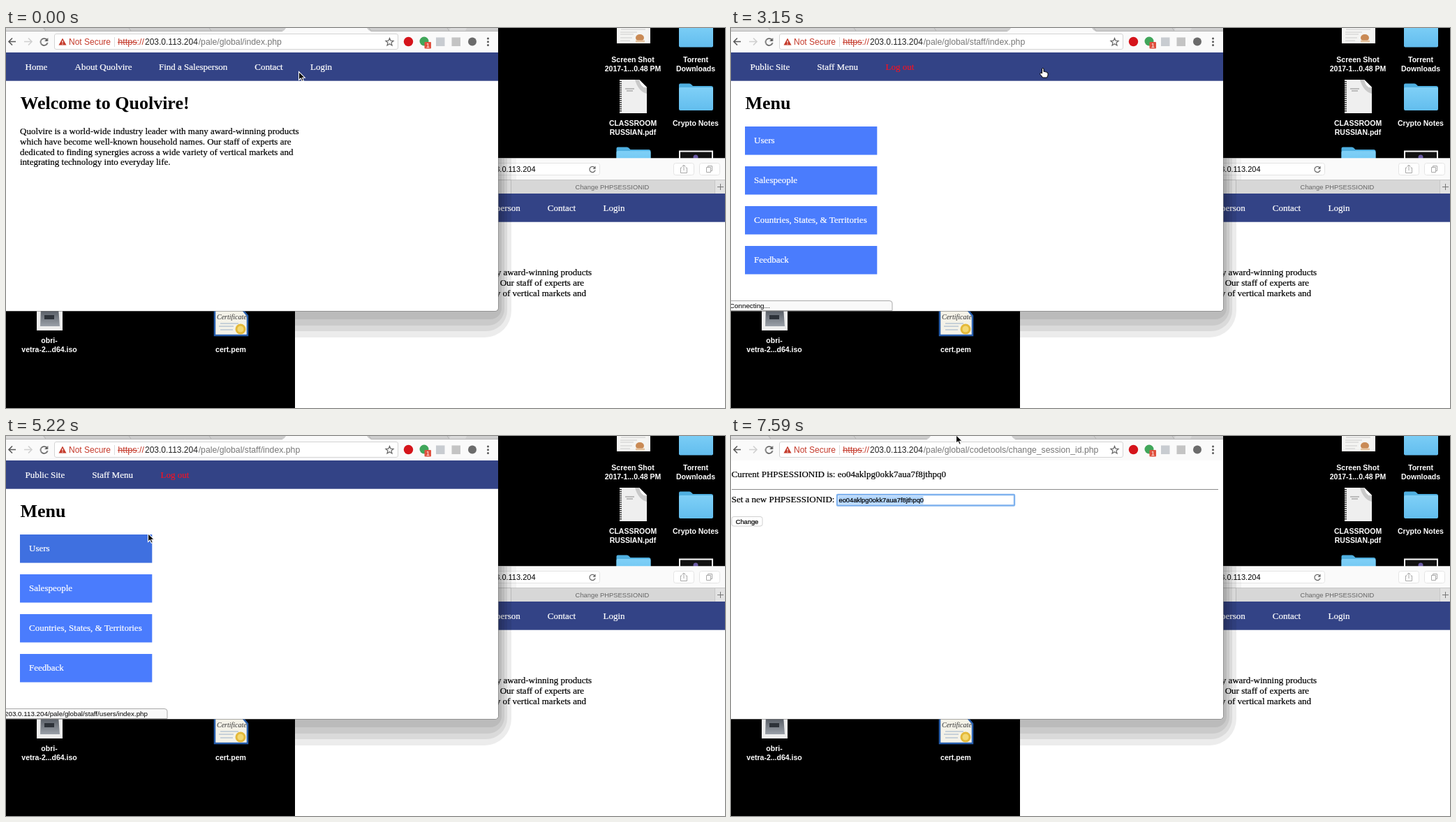
Recreate the animation shown at these times as an HTML page. Size 1030 px wide and 544 px high, loop 8 s.

```html
<!DOCTYPE html>
<html lang="en">
<head>
<meta charset="utf-8">
<title>Staff login</title>
<style>
html, body { margin: 0; width: 100%; height: 100%; overflow: hidden; background: #000; }
svg { display: block; width: 1030px; height: 544px; }
text { white-space: pre; }
.serif { font: 13px "Liberation Serif", serif; }
.serif text { stroke: #000; stroke-width: .22; }
.serif .white text { fill: #fff; stroke: #fff; }
.serif .white .red { fill: #f01426; stroke: #f01426; }
.serif .h1 { font-size: 26px; font-weight: bold; stroke: none; }
.ui { font: 12px "Liberation Sans", sans-serif; }
.path { font-size: 12.25px; fill: #777; }
.tip { font-size: 9.8px; }
.field { font-size: 9.3px; }
.label { font: bold 10.5px "Liberation Sans", sans-serif; fill: #fff; text-anchor: middle; }
.icon { fill: none; stroke: #5a5a5a; stroke-width: 1.6; }
.thin { fill: none; stroke: #a8a8a8; stroke-width: 1; }

.t { animation: 8s step-end infinite; }
.home { animation-name: home; }
.menu { animation-name: menu; }
.form { animation-name: form; }
.url1 { animation-name: url1; }
.url2 { animation-name: url2; }
.idle { animation-name: idle; }
.busy { animation-name: busy; }
.tip1 { animation-name: tip1; }
.tip2 { animation-name: tip2; }
.tip3 { animation-name: tip3; }
.before { animation-name: before; }
.lit { animation-name: lit; }
.users { animation-name: users; }
.arrow { animation-name: arrow; }
.hand { animation-name: hand; }
.mouse { animation-name: mouse; }

@keyframes home { 0% { opacity: 1 } 39.375%, to { opacity: 0 } }
@keyframes menu { 0% { opacity: 0 } 39.375% { opacity: 1 } 94.875%, to { opacity: 0 } }
@keyframes form { 0% { opacity: 0 } 94.875%, to { opacity: 1 } }
@keyframes url1 { 0% { opacity: 1 } 24.5%, to { opacity: 0 } }
@keyframes url2 { 0% { opacity: 0 } 24.5% { opacity: 1 } 94.875%, to { opacity: 0 } }
@keyframes idle { 0% { opacity: 1 } 20.75% { opacity: 0 } 39.375%, to { opacity: 1 } }
@keyframes busy { 0% { opacity: 0 } 20.75% { opacity: 1 } 39.375%, to { opacity: 0 } }
@keyframes tip1 { 0% { opacity: 0 } 5.75% { opacity: 1 } 24.5%, to { opacity: 0 } }
@keyframes tip2 { 0% { opacity: 0 } 24.5% { opacity: 1 } 44.875%, to { opacity: 0 } }
@keyframes tip3 { 0% { opacity: 0 } 61.625% { opacity: 1 } 74.375%, to { opacity: 0 } }
@keyframes before { 0% { opacity: 1 } 94.875%, to { opacity: 0 } }
@keyframes lit { 0% { opacity: 0 } 83.75%, to { opacity: 1 } }
@keyframes users { 0% { fill: #4a7cfd } 61.625% { fill: #3f70e0 } 72.5%, to { fill: #4a7cfd } }
@keyframes arrow { 0% { opacity: 1 } 5.75% { opacity: 0 } 43%, to { opacity: 1 } }
@keyframes hand { 0% { opacity: 0 } 5.75% { opacity: 1 } 43%, to { opacity: 0 } }
@keyframes mouse {
  0% { transform: translate(419px, 62px) }
  1.875% { transform: translate(424px, 62px) }
  3.875% { transform: translate(433px, 61px) }
  5.75% { transform: translate(443px, 59px) }
  7.75% { transform: translate(446px, 58px) }
  13.375% { transform: translate(447px, 57px) }
  43% { transform: translate(435px, 66px) }
  44.875% { transform: translate(395px, 85px) }
  46.75% { transform: translate(340px, 112px) }
  48.625% { transform: translate(289px, 137px) }
  50.5% { transform: translate(257px, 159px) }
  52.25% { transform: translate(238px, 160px) }
  54.125% { transform: translate(228px, 159px) }
  57.875% { transform: translate(222px, 158px) }
  59.75% { transform: translate(213px, 156px) }
  61.625% { transform: translate(206px, 151px) }
  63.375% { transform: translate(204px, 145px) }
  65.25% { transform: translate(203px, 139px) }
  67.125% { transform: translate(202px, 141px) }
  68.875% { transform: translate(201px, 143px) }
  70.625% { transform: translate(203px, 142px) }
  72.5% { transform: translate(250px, 128px) }
  74.375% { transform: translate(334px, 93px) }
  76.25% { transform: translate(320px, 28px) }
  78.125% { transform: translate(322px, 16px) }
  80% { transform: translate(322px, 9px) }
  83.75% { transform: translate(322px, 4px) }
  85.625% { transform: translate(322px, 0) }
  89.25% { transform: translate(321px, -1px) }
  91.125%, to { transform: translate(322px, -2px) }
}
</style>
</head>
<body>
<svg viewBox="0 0 1030 544" xmlns="http://www.w3.org/2000/svg">
<defs>
  <linearGradient id="blue" x2="0" y2="1"><stop stop-color="#7fd0f7"/><stop offset="1" stop-color="#62bdee"/></linearGradient>
  <linearGradient id="disk" x2="0" y2="1"><stop stop-color="#4b5058"/><stop offset="1" stop-color="#9aa0a8"/></linearGradient>
  <clipPath id="win"><path d="M0 0H705V400Q705 405 700 405H0Z"/></clipPath>
  <clipPath id="back"><path d="M414 186.500H1030V544H414Z"/></clipPath>

  <g id="folder">
    <path d="M0 3Q0 1 2 1H15Q17 1 18 2.500L20 4.500H46Q49 4.500 49 7V20H0Z" fill="#4fafe0"/>
    <rect y="6.500" width="49" height="33" rx="2" fill="url(#blue)"/>
  </g>

  <g id="site" class="serif">
    <rect y="35" width="1030" height="40.700" fill="#334386"/>
    <g class="white">
      <text x="27.500" y="60.300">Home</text>
      <text x="98.500" y="60.300">About Quolvire</text>
      <text x="219" y="60.300">Find a Salesperson</text>
      <text x="356.300" y="60.300">Contact</text>
      <text x="436" y="60.300">Login</text>
    </g>
    <text class="h1" x="20.500" y="116.300">Welcome to Quolvire!</text>
    <text x="20" y="152.300">Quolvire is a world-wide industry leader with many award-winning products</text>
    <text x="20" y="166.900">which have become well-known household names. Our staff of experts are</text>
    <text x="20" y="181.600">dedicated to finding synergies across a wide variety of vertical markets and</text>
    <text x="20" y="196.200">integrating technology into everyday life.</text>
  </g>

  <g id="reload">
    <path d="M4 -3.200A5 5 0 1 0 5 1" fill="none" stroke-width="1.500"/>
    <path d="M5.600 -6V-1H.600Z" stroke="none"/>
  </g>
  <path id="bubble" d="M-2 390.500H227Q231 390.500 231 394V404.500H-2Z" fill="#f9f9f9" stroke="#a9a9a9"/>
</defs>

<rect width="1030" height="544"/>

<!-- desktop -->
<path d="M875 0H923V22H875Z" fill="#f4f4f2"/>
<path d="M881 2H916M880 6H904M880 9H899M880 14H897M880 18H894" stroke="#ccc"/>
<ellipse cx="908" cy="14" rx="6" ry="5" fill="#c98a55"/>
<path d="M902 19H915" stroke="#e6c5a2" stroke-width="3"/>
<use href="#folder" x="964" y="-12"/>
<use href="#folder" x="964" y="78.500"/>
<use href="#folder" x="874.500" y="169.500"/>
<path d="M879 74H907L918 85V122H879Z" fill="#efefef"/>
<path d="M901 74H907L918 85V94Q906 91 901 74Z" fill="#c9c9c9"/>
<path d="M907 74L918 85Q910 87 907 74Z" fill="#fff"/>
<path d="M887 87H900M889 90H898" stroke="#888"/>
<path d="M880.500 76V121" stroke="#333" stroke-width="3" stroke-dasharray="1.500 1.500"/>
<path d="M965 187V176.500H1012V187" fill="#111" stroke="#fff" stroke-width="2"/>
<circle cx="988" cy="185" r="3.500" fill="#6a5ba5"/>
<path d="M44 400H81V433H44Z" fill="#eee"/>
<path d="M50 400H75L77 427H49Z" fill="url(#disk)"/>
<rect x="55" y="411" width="14" height="6" fill="#2d3239"/>
<path d="M299 400H336L346 412V440H299Z" fill="#f4f2e8" stroke="#285fae" stroke-width="2.500"/>
<text x="302" y="417" font-family="Liberation Serif, serif" font-style="italic" font-size="10" fill="#333">Certificate</text>
<path d="M307 423H333M305 427H326M307 432H325" stroke="#9ab0c9"/>
<circle cx="336" cy="431" r="7.500" fill="#e4b93a"/>
<circle cx="336" cy="431" r="4.500" fill="#f3d873"/>
<g class="label">
  <text x="898" y="49">Screen Shot</text><text x="898" y="62">2017-1...0.48 PM</text>
  <text x="988" y="49">Torrent</text><text x="988" y="62">Downloads</text>
  <text x="898" y="140">CLASSROOM</text><text x="898" y="153">RUSSIAN.pdf</text>
  <text x="988" y="140">Crypto Notes</text>
  <text x="62" y="451">obri-</text><text x="62" y="464">vetra-2...d64.iso</text>
  <text x="322" y="464">cert.pem</text>
</g>

<!-- rear window -->
<g clip-path="url(#back)">
  <rect x="414" y="186" width="616" height="358" fill="#fff"/>
  <use href="#site" x="419.500" y="202"/>
  <rect x="414" y="186" width="616" height="32" fill="#fafafa"/>
  <rect x="600.500" y="193.500" width="250" height="17" rx="3" fill="#fff" stroke="#e4e4e4"/>
  <text class="ui" x="758.500" y="206" style="font-size:11px" text-anchor="end">203.0.113.204</text>
  <use href="#reload" transform="translate(840 202.500) scale(.82)" fill="#666" stroke="#666"/>
  <g fill="#fff" stroke="#e4e4e4">
    <rect x="956.500" y="193.500" width="29" height="17" rx="3"/>
    <rect x="993.500" y="193.500" width="29" height="17" rx="3"/>
  </g>
  <path class="thin" d="M968.500 200H966.500V207.500H975.500V200H973.500M971 204V196M968.500 198.500L971 196L973.500 198.500M1003.500 199.500H1009.500V206.500H1003.500ZM1005.500 199V197.500H1011.500V204.500H1010"/>
  <rect x="414" y="217.500" width="616" height="19.500" fill="#d7d7d7"/>
  <rect x="414" y="217.500" width="310" height="19.500" fill="#e9e9e9"/>
  <path d="M414 217.500H1030M723.500 218V237M1015.500 218V237" stroke="#c8c8c8"/>
  <rect x="1016" y="218" width="14" height="19" fill="#e2e2e2"/>
  <path d="M1019 227.500H1028M1023.500 223V232" stroke="#777"/>
  <text class="ui" x="868.500" y="230.500" text-anchor="middle" fill="#666" style="font-size:9.4px">Change PHPSESSIONID</text>
  <path d="M600 186H731V218H600Z" opacity=".03"/>
  <g fill-opacity=".075">
    <rect x="-80" y="-80" width="804" height="523" rx="38"/>
    <rect x="-80" y="-80" width="798" height="514" rx="30"/>
    <rect x="-80" y="-80" width="794" height="506" rx="24"/>
    <rect x="-80" y="-80" width="790" height="497" rx="16"/>
  </g>
</g>
<path d="M0 405.500H700Q705.500 405.500 705.500 400V186" fill="none" stroke="#777" stroke-opacity=".6"/>

<!-- front window -->
<g clip-path="url(#win)">
  <rect width="705" height="405" fill="#fff"/>
  <use href="#site" class="t home"/>

  <g class="t menu serif">
    <rect y="35" width="705" height="370" fill="#fff"/>
    <rect y="35" width="705" height="40.700" fill="#334386"/>
    <g class="white">
      <text x="27.500" y="60.300">Public Site</text>
      <text x="123.300" y="60.300">Staff Menu</text>
      <text class="red" x="221.500" y="60.300">Log out</text>
    </g>
    <text class="h1" x="20.500" y="116.300">Menu</text>
    <rect class="t users" x="20" y="141" width="189.300" height="40.600"/>
    <path fill="#4a7cfd" d="M20 198H209.300V238.600H20ZM20 255H209.300V295.600H20ZM20 312H209.300V352.600H20Z"/>
    <g class="white">
      <text x="33" y="165.300">Users</text>
      <text x="33" y="222.300">Salespeople</text>
      <text x="33" y="279.300">Countries, States, &amp; Territories</text>
      <text x="33" y="336.300">Feedback</text>
    </g>
  </g>

  <g class="t form serif">
    <rect y="35" width="705" height="370" fill="#fff"/>
    <text x=".7" y="59.300">Current PHPSESSIONID is: eo04aklpg0okk7aua7f8jthpq0</text>
    <path d="M1 76.500H698" stroke="#8a8a8a"/>
    <text x=".7" y="95.300">Set a new PHPSESSIONID:</text>
    <rect x="152" y="84" width="254" height="15.500" rx="1" fill="#fff" stroke="#7fb2ee" stroke-width="2.400"/>
    <rect x="154" y="86" width="121.500" height="11.500" fill="#b3d6fd"/>
    <rect x="1" y="115.500" width="44" height="13.500" rx="3" fill="#fff" stroke="#d0d0d0"/>
    <g class="ui">
      <text class="field" x="154.500" y="95.200">eo04aklpg0okk7aua7f8jthpq0</text>
      <text class="field" x="23" y="125.500" text-anchor="middle">Change</text>
    </g>
  </g>

  <!-- tabs and toolbar -->
  <rect width="705" height="35" fill="#fafafa"/>
  <rect width="705" height="5" fill="#cdcdcd"/>
  <path d="M0 0H53L56 4.500H634L637 0H660L658 4.500H0Z" fill="#d9d9d9"/>
  <path d="M280 5Q285 4 288 0H400Q403 4 409 5Z" class="t lit" fill="#e6e6e6"/>
  <path d="M0 4.500H705M54 0L57 4M176 0L179 4M291 0L294 4M520 0L523 4M632 0L635 4" stroke="#b3b3b3" fill="none"/>
  <path class="t before" d="M394 5.500Q399 4 401 0H517Q519 4 525 5.500Z" fill="#fafafa"/>
  <path class="t form" d="M279 5.500Q284 4 286 0H402Q404 4 409 5.500Z" fill="#fafafa"/>
  <path class="icon" d="M14 19.500H4.500M9 14.500L4 19.500L9 24.500"/>
  <path class="icon" d="M26 19.500H36M32 14.500L37 19.500L32 24.500" style="stroke:#d0d0d0"/>
  <use href="#reload" class="t idle" x="54.500" y="20" fill="#5a5a5a" stroke="#5a5a5a"/>
  <path class="icon t busy" d="M50 15.500L59 24.500M59 15.500L50 24.500"/>
  <rect x="69.500" y="8.500" width="492" height="22" rx="2.500" fill="#fff" stroke="#d4d4d4"/>
  <path d="M81 14.500L86.500 24.500H75.500Z" fill="#c53a2b"/>
  <path d="M81 18V21.300M81 22.200V23.400" stroke="#fff" stroke-width="1.200"/>
  <path d="M155.500 13V27" stroke="#dcdcdc"/>
  <g class="ui">
    <text x="90" y="24.200" fill="#c53a2b">Not Secure</text>
    <text x="160.300" y="24.200" fill="#c53a2b" style="font-size:12.6px">https://</text>
    <path d="M160 20.500H188" stroke="#c53a2b"/>
    <text x="199" y="24.200" fill="#222">203.0.113.204</text>
    <text class="path t url1" x="275.700" y="24.200">/pale/global/index.php</text>
    <text class="path t url2" x="275.700" y="24.200">/pale/global/staff/index.php</text>
    <text class="path t form" x="275.700" y="24.200">/pale/global/codetools/change_session_id.php</text>
  </g>
  <path d="M549.500 14.500L551 18.200L555 18.500L552 21L553 25L549.500 22.800L546 25L547 21L544 18.500L548 18.200Z" fill="none" stroke="#666" stroke-width="1.200"/>
  <circle cx="576.500" cy="19.500" r="6.700" fill="#d5141b"/>
  <circle cx="599" cy="19" r="6.500" fill="#40a65a"/>
  <rect x="599.500" y="20" width="9.500" height="9.500" rx="1" fill="#e0513f"/>
  <text class="ui" x="604.200" y="28" text-anchor="middle" fill="#fff" style="font-size:9px">1</text>
  <rect x="616" y="13.500" width="12.500" height="12.500" fill="#c8ccd1"/>
  <rect x="638.500" y="13.500" width="12.500" height="12.500" fill="#c4c4c4"/>
  <circle cx="668" cy="19.500" r="6" fill="#6b6b6b"/>
  <g fill="#5a5a5a"><circle cx="690.500" cy="15" r="1.500"/><circle cx="690.500" cy="19.700" r="1.500"/><circle cx="690.500" cy="24.400" r="1.500"/></g>

  <!-- status bubble -->
  <g class="ui">
    <g class="t tip1"><use href="#bubble"/><text class="tip" x="-2" y="401">203.0.113.204/pale/global/staff/index.php</text></g>
    <g class="t tip2"><use href="#bubble"/><text class="tip" x="-2" y="401">Connecting...</text></g>
    <g class="t tip3"><use href="#bubble"/><text class="tip" x="-2" y="401">203.0.113.204/pale/global/staff/users/index.php</text></g>
  </g>
</g>

<g class="t mouse">
  <path class="t arrow" d="M.5 .5V12.500L3.300 10L5.200 14.300L7.300 13.400L5.500 9.200H9.200Z" fill="#000" stroke="#fff" stroke-width="1.100"/>
  <path class="t hand" d="M-1.500 8V2Q-1.500 .5 -.2 .5Q1 .5 1 2V5.500Q2.500 4.300 3.300 6Q4.800 5.200 5.300 6.800Q7 6.300 7 8V10.500Q6.500 12 5.600 14H-.5Q-2 11.500 -4 9.500Q-5 7.500 -3.200 7.200Q-2.300 7.300 -1.500 8Z" fill="#fff" stroke="#000"/>
</g>
</svg>
</body>
</html>
```
